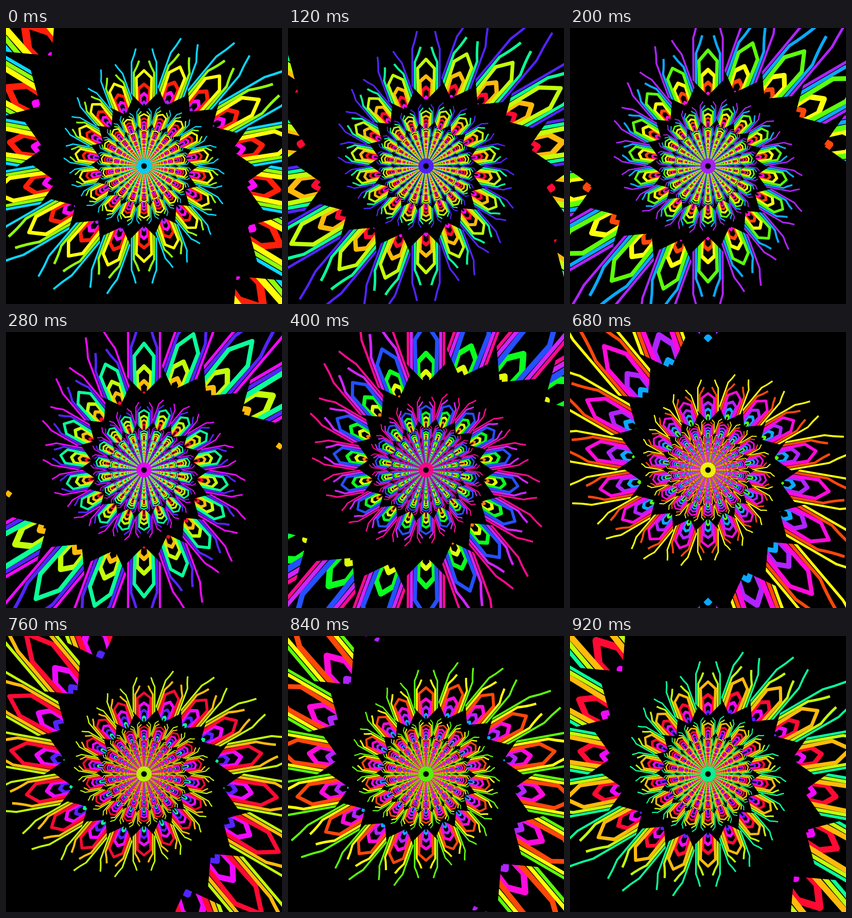
Write an HTML page with a canvas that moves like this. It is 540 px wide and 540 px high and loops after 960 ms.

```html
<!DOCTYPE html>
<html lang="en">
<head>
<meta charset="utf-8">
<title>Feather spiral</title>
<style>
  html, body { margin: 0; width: 100%; height: 100%; overflow: hidden; background: #000; }
  canvas { display: block; width: 540px; height: 540px; }
</style>
</head>
<body>
<canvas id="stage" width="540" height="540"></canvas>
<script>
const ctx = document.getElementById('stage').getContext('2d');
const LOOP = 960, STEP = 40, PETALS = 18, TURN = 9, FAR = 125;

const hues = [5, 15, 28, 43, 60, 61, 67, 75, 87, 100, 125, 155,
              190, 201, 228, 253, 275, 278, 287, 296, 300, 309, 328, 350];

// Nested bands of one petal, outermost first.
// end: depth of the outer end, cut: half gap left open there (0 = closed tip),
// bend: depth of the shoulder, half: half width of the legs, line: stroke width
const bands = [
  { end: 0.2,  cut: 190, bend: 1.35, half: 290, line: 40 },
  { end: 1.2,  cut: 113, bend: 2.45, half: 235, line: 48 },
  { end: 2.2,  cut: 0,   bend: 3.1,  half: 178, line: 64 },
  { end: 4.0,  cut: 0,   bend: 4.75, half: 132, line: 76 },
  { end: 5.6,  cut: 0,   bend: 6.25, half: 90,  line: 70 },
  { end: 7.4,  cut: 0,   bend: 8.0,  half: 52,  line: 56 }
];

const mod = (a, n) => ((a % n) + n) % n;
const radius = depth => 2000 / Math.max(0.2, depth);

function bandColor(i, tick) {
  const h = hues[mod(12 - 4 * i + tick, hues.length)];
  return `hsl(${h},100%,${h > 220 && h < 290 ? 57 : 52}%)`;
}

function drawBand(b, z, w, base) {
  const top = -radius(z + b.end), bend = -radius(z + b.bend);
  const x = b.half / w, gap = b.cut / w;
  ctx.beginPath();
  if (gap) {
    for (const s of [-1, 1]) {
      ctx.moveTo(s * gap, top);
      ctx.quadraticCurveTo(s * (gap + (x - gap) * 0.35), top + (bend - top) * 0.5, s * x, bend);
      ctx.lineTo(s * x * 0.98, -base);
    }
  } else {
    ctx.moveTo(-x * 0.9, -base);
    ctx.lineTo(-x, bend);
    ctx.lineTo(0, top);
    ctx.lineTo(x, bend);
    ctx.lineTo(x * 0.9, -base);
  }
  ctx.lineWidth = b.line / w;
  ctx.stroke();
}

function drawPetal(k, z, colors) {
  const w = z + 3.4, base = 1380 / w, side = 340 / w, top = -20000;
  ctx.save();
  ctx.rotate(k * 2 * Math.PI / PETALS);
  // the foot of each petal is cut to a V
  ctx.beginPath();
  ctx.moveTo(0, -base);
  ctx.lineTo(side, -base - side);
  ctx.lineTo(side, top);
  ctx.lineTo(-side, top);
  ctx.lineTo(-side, -base - side);
  ctx.clip();
  for (let i = bands.length - 1; i >= 0; i--) {
    ctx.strokeStyle = colors[i];
    drawBand(bands[i], z, w, base);
  }
  ctx.restore();
}

function disc(r, fill) {
  ctx.beginPath();
  ctx.arc(0, 0, r, 0, 2 * Math.PI);
  ctx.fillStyle = fill;
  ctx.fill();
}

function drawCore(color) {
  disc(15, color);
  ctx.strokeStyle = 'rgba(0,0,0,.35)';
  ctx.lineWidth = 0.6;
  ctx.beginPath();
  for (let k = 0; k < PETALS; k++) {
    const a = (k + 0.5) * 2 * Math.PI / PETALS;
    ctx.moveTo(0, 0);
    ctx.lineTo(22 * Math.sin(a), -22 * Math.cos(a));
  }
  ctx.stroke();
  disc(5.5, '#000');
}

function draw(ms) {
  const tick = Math.floor(mod(ms, LOOP) / STEP);
  const shift = TURN * tick * STEP / LOOP;
  const colors = bands.map((b, i) => bandColor(i, tick));

  ctx.setTransform(1, 0, 0, 1, 0, 0);
  ctx.fillStyle = '#000';
  ctx.fillRect(0, 0, 540, 540);
  ctx.translate(270, 270);
  ctx.lineJoin = 'round';

  for (let ring = 0; ring * TURN < FAR; ring++) {
    for (let k = 0; k < PETALS; k++) {
      const z = mod(9.5 - k - shift, TURN) - 1 + ring * TURN;
      drawPetal(k, z, colors);
    }
  }
  drawCore(colors[0]);
}

let start;
function frame(now) {
  if (start === undefined) start = now;
  draw(now - start);
  requestAnimationFrame(frame);
}
draw(0);
requestAnimationFrame(frame);
</script>
</body>
</html>
```
